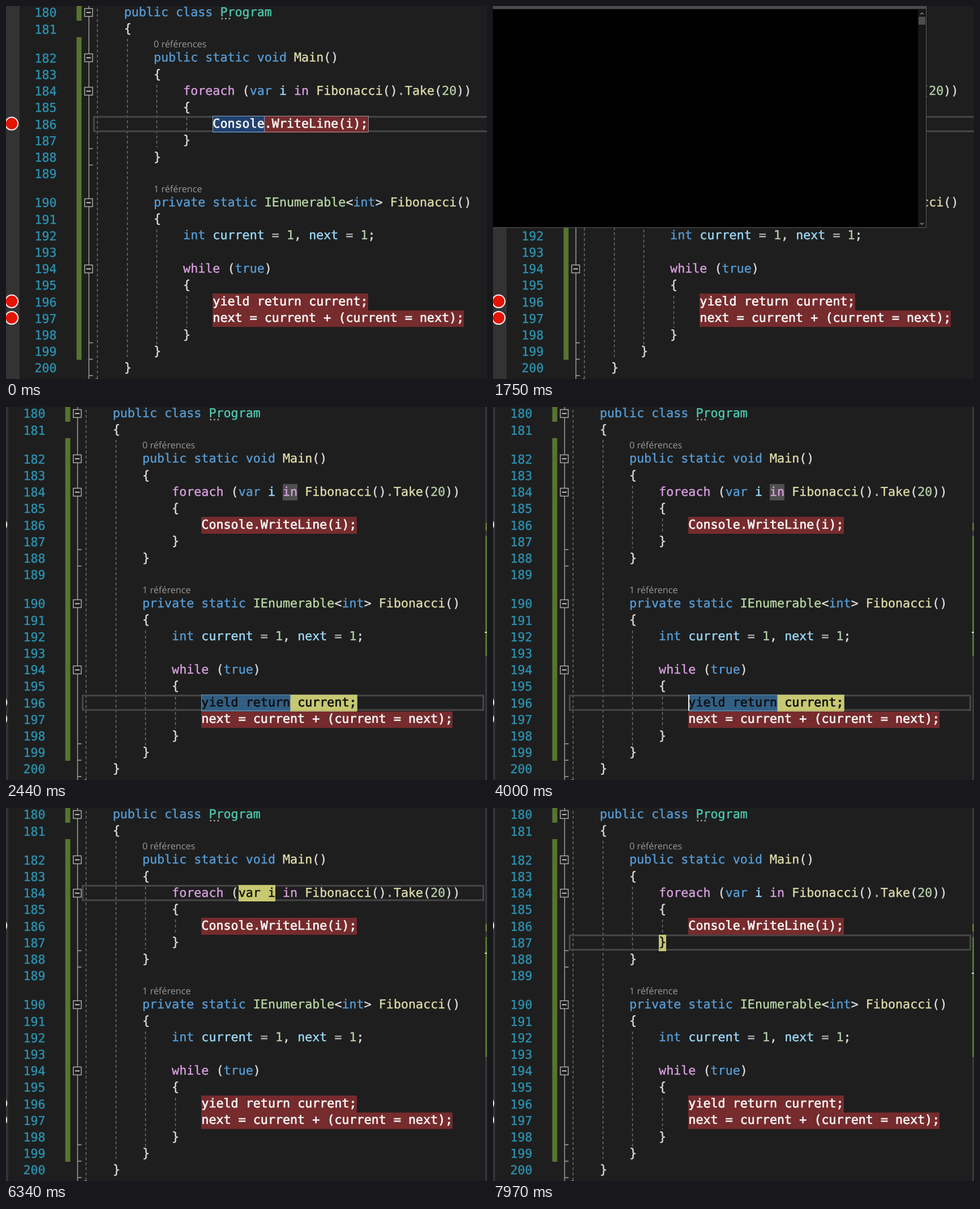
An HTML page for the animation above (8 s loop, 850 by 659 pixels).

```html
<!DOCTYPE html>
<html lang="fr">
<head>
<meta charset="utf-8">
<title>Iterator debugging</title>
<style>
html, body { margin: 0; width: 100%; height: 100%; overflow: hidden; background: #1e1e1e; }
svg { display: block; width: 850px; height: 659px; }
text { font: 21.69px "DejaVu Sans Mono", "Noto Sans Mono", monospace; text-rendering: geometricPrecision; white-space: pre; }
.lens { font: 16.2px "Open Sans", "Noto Sans", sans-serif; fill: #999; }
</style>
</head>
<body>
<svg viewBox="0 0 850 659">
  <g id="editor"></g>
  <g id="term">
    <rect width="766" height="392" fill="#5a5a5a"/>
    <rect width="765" height="391"/>
    <rect width="765" height="5.5" fill="#4b4b4b"/>
    <rect x="751" y="5.5" width="14" height="385.5" fill="#171717"/>
    <rect x="752" y="19" width="12" height="14" fill="#4d4d4d"/>
    <path d="M755 15l3-3 3 3M755 383l3 3 3-3" fill="none" stroke="#8a8a8a" stroke-width="1.3"/>
  </g>
</svg>
<script>
const LOOP = 8000, CW = 13.06, LEFT = 156.4;
const editor = document.getElementById('editor');
const term = document.getElementById('term');

const colX = c => LEFT + c * CW;
const rowY = n => 11 + 29.2 * (n - 180) + (n > 181 ? 22 : 0) + (n > 189 ? 22 : 0);
const rect = (x, y, w, h, fill, extra = '') =>
  `<rect x="${x}" y="${y}" width="${w}" height="${h}" fill="${fill}" ${extra}/>`;
const path = (d, stroke, extra = '') =>
  `<path d="${d}" fill="none" stroke="${stroke}" ${extra}/>`;
const esc = s => s.replace(/&/g, '&amp;').replace(/</g, '&lt;').replace(/>/g, '&gt;');
const text = (x, y, s, fill, weight = .4) =>
  `<text x="${x.toFixed(2)}" y="${y.toFixed(1)}" fill="${fill}" stroke="${fill}" stroke-width="${weight}">${esc(s)}</text>`;

const code = {
  180: [4, 'public class Program'],
  181: [4, '{'],
  182: [8, 'public static void Main()'],
  183: [8, '{'],
  184: [12, 'foreach (var i in Fibonacci().Take(20))'],
  185: [12, '{'],
  186: [16, 'Console.WriteLine(i);'],
  187: [12, '}'],
  188: [8, '}'],
  190: [8, 'private static IEnumerable<int> Fibonacci()'],
  191: [8, '{'],
  192: [12, 'int current = 1, next = 1;'],
  194: [12, 'while (true)'],
  195: [12, '{'],
  196: [16, 'yield return current;'],
  197: [16, 'next = current + (current = next);'],
  198: [12, '}'],
  199: [8, '}'],
  200: [4, '}'],
  201: [0, '}']
};
const breaks = [186, 196, 197];

const palette = [
  [/^(public|private|class|static|void|int|var|true)$/, '#569cd6'],
  [/^(foreach|in|while)$/, '#d8a0df'],
  [/^(Main|Fibonacci|Take)$/, '#dcdcaa'],
  [/^Program$/, '#4ec9b0'],
  [/^IEnumerable$/, '#b8d7a3'],
  [/^(i|current|next)$/, '#9cdcfe'],
  [/^\d+$/, '#b5cea8'],
  [/^[.=]$/, '#b4b4b4']
];
const tint = s => (palette.find(p => p[0].test(s)) || [0, '#dcdcdc'])[1];

// A mark is [row, first column, length, background, text colour].
const YELLOW = '#c7c870', GREY = '#4f4f4f', BLUE = '#325f85', RED = '#762b2d';
const full = n => [n, code[n][0], code[n][1].length, YELLOW, '#101010'];
const inWord = [184, 27, 2, GREY];

// Editor states in order of time.
const steps = [
  { at: 0, line: 186, idle: true, box: true, marks: [[186, 16, 7, '#21416f', '#f4f4f4']] },
  { at: 1820, caret: true },
  { at: 2140, line: 196, idle: false, box: false, bare: true, marks: [inWord, full(196)] },
  { at: 2440, box: true, caret: false, marks: [inWord, full(196), [196, 16, 12, BLUE, '#101010']] },
  { at: 2670, bare: false },
  { at: 2900, caret: true },
  { at: 3450, caret: false },
  { at: 4000, caret: true },
  { at: 4550, caret: false },
  { at: 5080, caret: true },
  { at: 5560, caret: false },
  { at: 5950, line: 184, box: false, marks: [[184, 27, 2, YELLOW, '#101010']] },
  { at: 6340, marks: [[184, 21, 5, YELLOW, '#101010']] },
  { at: 7040, line: 185, caret: true, marks: [full(185)] },
  { at: 7270, caret: false, marks: [full(185), [187, 12, 1, GREY]] },
  { at: 7500, line: 186, marks: [full(186)] },
  { at: 7900, line: 187, marks: [full(187)] }
];
for (let i = 1; i < steps.length; i++) steps[i] = { ...steps[i - 1], ...steps[i] };

function margins(s) {
  let out = rect(0, 0, 24, 659, '#333');
  for (const [a, b] of [[0, 26], [55, 625]]) out += rect(124.7, a, 8.8, b - a, '#577430');
  out += path('M146.5 0V659M146 252h7.5M146 281h7.5M146 595h7.5M146 624h7.5M146 653h7.5', '#a5a5a5', 'stroke-width="1.4"');
  for (const n of [180, 182, 184, 190, 194]) {
    const y = Math.round(rowY(n)) + .5;
    out += rect(139, y - 7, 14, 14, '#1e1e1e', 'stroke="#b0b0b0" stroke-width="1.4"');
    out += path(`M142 ${y}h8`, '#e6e6e6', 'stroke-width="1.6"');
  }
  for (const n of breaks)
    out += `<circle cx="10" cy="${rowY(n) - .4}" r="11.2" fill="#e51400" stroke="#f3ecec" stroke-width="2"/>`;
  for (let n = 180; n < 201; n++) out += text(50.5, rowY(n) + 8.3, String(n), '#2b91af');

  let d = 'M161.5 5V659M214.5 58V620M266.5 395V600M319.5 512V568';
  if (!s.bare) d += 'M266.5 139V250M319.5 197V223';
  out += path(d, '#757575', 'stroke-width="1.4" stroke-dasharray="5 4"');

  // Scroll bar overview at the far right
  out += rect(867, 0, 3, 659, '#3a3a3c') + rect(867, 205, 3, 13, '#577430') + rect(867, 228, 3, 212, '#577430');
  return out + rect(866, 267.5 + 11.8 * (s.line - 185), 4, 1.8, '#e8e8e8');
}

function codeRow(n, marks) {
  const [col, line] = code[n];
  const onRed = breaks.includes(+n);
  let out = '';
  for (const m of line.matchAll(/[A-Za-z]+|\d+|[^\sA-Za-z\d]/g)) {
    const c = col + m.index;
    let fill = onRed ? '#f6f6f6' : tint(m[0]);
    for (const k of marks)
      if (k[0] == n && k[4] && c >= k[1] && c < k[1] + k[2]) fill = k[4];
    out += text(colX(c), rowY(+n) + 6.9, m[0], fill, onRed ? .7 : .4);
  }
  return out;
}

function scene(s) {
  const y = rowY(s.line);
  const [first, line] = code[s.line];
  const band = (n, c, len, fill) =>
    rect(colX(c), rowY(n) - 13.9, len * CW, 29.2, fill, 'shape-rendering="crispEdges"');
  let out = margins(s);
  out += rect(155.5, y - 12.4, 708, 25.5, 'none', 'stroke="#464646" stroke-width="3"');
  for (const n of breaks) out += band(n, code[n][0], code[n][1].length, RED);
  for (const m of s.marks) out += band(...m);
  if (s.box) {
    const last = s.marks[s.marks.length - 1];
    const top = Math.round(y - 13.9) + .5;
    const x = Math.round(colX(first)) + .5;
    const edge = s.idle ? '#9a8f90' : '#a3aa7c';
    out += rect(x, top, Math.round(line.length * CW) + 1, 28, 'none', `stroke="${edge}"`);
    out += rect(x, top, Math.round(last[2] * CW), 28, 'none', `stroke="${s.idle ? '#86a6c4' : '#6f93ac'}"`);
  }
  for (const n in code) out += codeRow(n, s.marks);
  out += '<text class="lens" x="261" y="73">0 références</text><text class="lens" x="261" y="328.6">1 référence</text>';
  for (const x of [380.5, 387, 393.5]) out += rect(x, 21, 2.6, 2.6, '#a0a0a0');
  if (s.caret) out += rect(Math.round(colX(first)), y - 14, 2, 28, '#f0f0f0');
  return out;
}

let shown = null;
function draw(t) {
  const s = steps.findLast(k => k.at <= t);
  if (s !== shown) {
    shown = s;
    editor.innerHTML = scene(s);
    editor.setAttribute('transform', `translate(${s.idle ? 0 : -20} 0)`);
  }
  const open = t >= 1440 && t < 1820;
  term.style.display = open ? '' : 'none';
  if (open) {
    const p = Math.min(1, (t - 1440 + 40) / 200);
    const e = 1 - (1 - p) ** 3;
    const k = .92 + .08 * e;
    term.setAttribute('opacity', e);
    term.setAttribute('transform', `translate(${300 * (1 - k)} ${150 * (1 - k)}) scale(${k})`);
  }
}

const start = performance.now();
function tick() {
  draw((performance.now() - start) % LOOP);
  requestAnimationFrame(tick);
}
tick();
</script>
</body>
</html>
```
